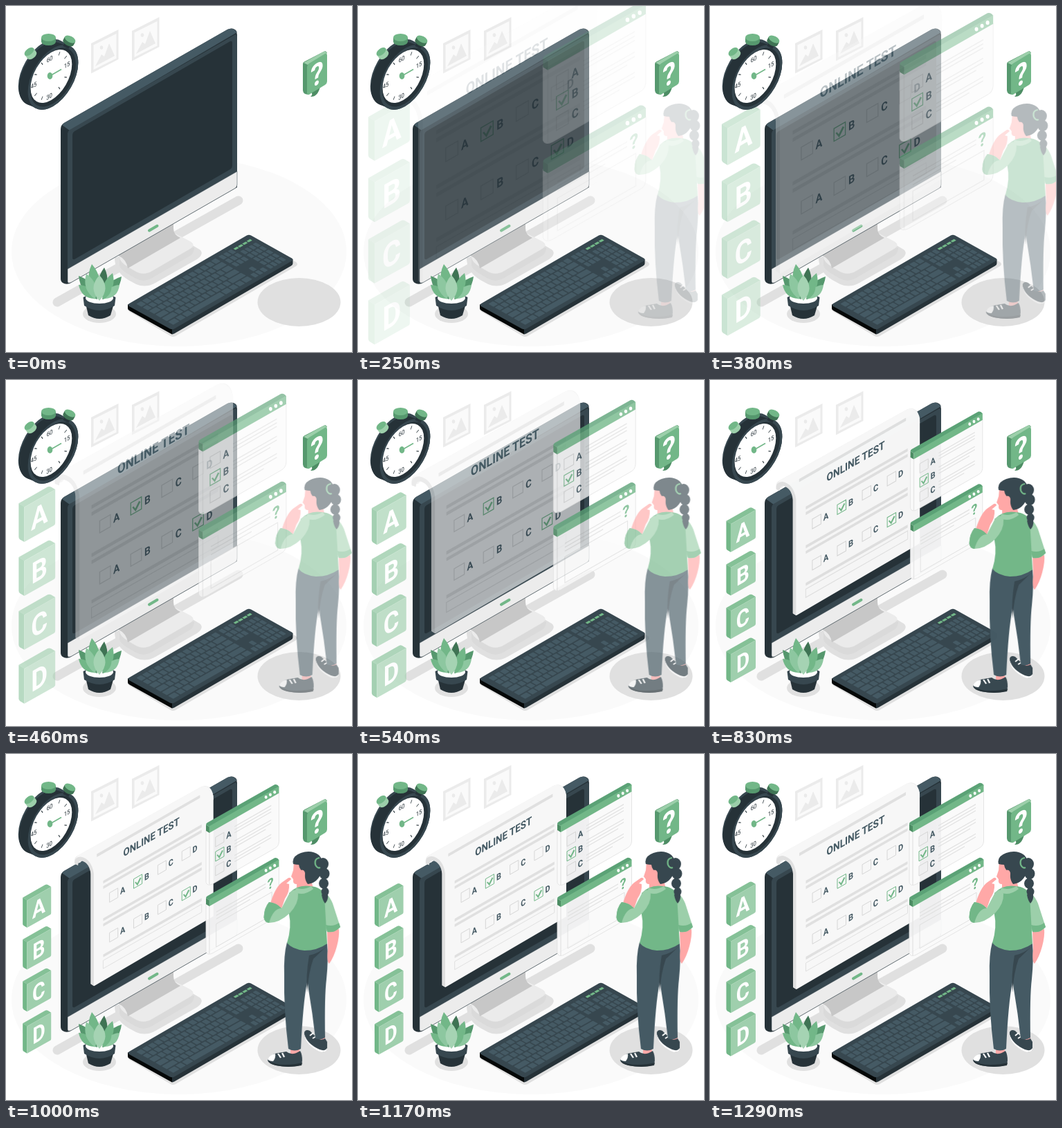
Animation, 500 px wide and 500 px high, one loop 1330 ms. Source, as an HTML page:

```html
<!DOCTYPE html>
<html lang="en">
<head>
<meta charset="utf-8">
<title>Online test</title>
<style>
html, body { margin: 0; width: 100%; height: 100%; overflow: hidden; background: #fff; }
svg { display: block; width: 100%; height: 100%; }
text { font-family: Roboto, "Liberation Sans", sans-serif; font-weight: 700; text-anchor: middle; }
.g { fill: #72b788; } .k { fill: #263238; } .d { fill: #37474f; } .s { fill: #455a64; }
.sh { fill: #e0e0e0; } .skin { fill: #ffa8a7; } .w { fill: #fff; }
#paper, #cards { animation: zoom 1330ms infinite; }
#paper { transform-origin: 199.5px 191px; }
#cards { transform-origin: 44.5px 310px; }
#windows { animation: zoomQuick 1330ms infinite; transform-origin: 342px 166.5px; }
#woman { animation: slide 1330ms infinite; }
@keyframes zoom {
  0% { opacity: 0; transform: scale(1.5); animation-timing-function: cubic-bezier(.32, -.01, .49, 1.38); }
  94%, 100% { opacity: 1; transform: scale(1); }
}
@keyframes zoomQuick {
  0% { opacity: 0; transform: scale(1.5); animation-timing-function: cubic-bezier(.32, -.01, .49, 1.38); }
  80%, 100% { opacity: 1; transform: scale(1); }
}
@keyframes slide {
  0% { opacity: 0; transform: translateX(30px); animation-timing-function: cubic-bezier(.32, -.01, .49, 1.38); }
  94%, 100% { opacity: 1; transform: translateX(0); }
}
</style>
</head>
<body>
<svg viewBox="0 0 500 500">
  <ellipse cx="250" cy="355" rx="242" ry="137" fill="#fafafa"/>
  <path d="M74 428L336 281" stroke="#e0e0e0" stroke-width="13" stroke-linecap="round"/>
  <ellipse cx="423.5" cy="428" rx="60" ry="35" class="sh"/>
  <g id="frames"></g>

  <g id="monitor">
    <path d="M157 364Q157 384 177 396L188 402Q202 408 216 400L276 366Q287 358 280 352L246 332z" class="sh"/>
    <path d="M164 364V374Q164 380 176 387L188 394Q199 400 211 393L266 361Q272 357 272 349z" fill="#dadada"/>
    <path d="M164 362Q164 370 176 377L188 384Q199 390 211 383L266 351Q275 345 266 340L243 328z" fill="#ebebeb"/>
    <path d="M163 358L242 313V321Q242 331 252 335L176 379Q174 366 163 361z" fill="#c7c7c7"/>
    <path d="M79 178Q79 172 84 169L320 34Q328 30 333 36L334 42V262L92 401Q86 403 82 400Q79 398 79 394z" class="k"/>
    <path d="M81 172L84 169L320 34Q328 30 334 38L92 180z" class="s"/>
    <path d="M89 184Q89 181 92 179L330 42Q334 40 334 44V240L89 380z" class="d"/>
    <path d="M96 187Q96 183 99 181L324 51Q327 50 327 53V231Q327 234 324 236L99 366Q96 367 96 364z" class="k"/>
    <path d="M89 380L334 239V258Q334 262 330 264L95 399Q89 402 89 398z" fill="#ececec" stroke="#37474f" stroke-width=".5"/>
    <path d="M207 324.500L218.500 317.800" stroke="#72b788" stroke-width="4" stroke-linecap="round"/>
  </g>

  <g id="paper"></g>
  <g id="windows"></g>

  <g id="keyboard">
    <path d="M177 441L238 477Q241 479 245 477L419 376Q423 373 419 370L404 362z" class="sh"/>
    <path d="M176 431L240 466V474.500L178 440Q176 439 176 437z" fill="#050808"/>
    <path d="M240 465L414.500 366V372Q414.500 374 412 375.500L243 473.500L240 474.500z" class="k"/>
    <path d="M178 430L348 331.500Q351 330 354 331.500L413 364.500Q416 366.500 413 368.500L243 466.500Q240 468 237 466.500L178 434Q175 432 178 430z" class="d"/>
    <g id="keys" transform="matrix(.866 -.498 .866 .49 177 431)" class="s"></g>
  </g>

  <g id="plant">
    <ellipse cx="135" cy="445" rx="24" ry="13" class="sh"/>
    <path d="M115 430L119 447Q135 457 151 447L156 430z" class="k"/>
    <path d="M111.500 421Q135 408 158.500 421L157 433Q135 447 113 433z" class="d"/>
    <ellipse cx="135" cy="422" rx="20" ry="8" class="w"/>
    <g id="leaves"></g>
  </g>

  <g id="cards"></g>

  <g id="bubble">
    <path d="M441 123Q444 128 440 131Q450 132 454 117z" fill="#4d8d64"/>
    <path d="M429 84Q429 81 432 80L459 66Q463 64 464 68L436 88V128L432 127Q429 125 429 122z" fill="#56986e"/>
    <path d="M430 82L459 66Q462 65 464 68L436 85z" fill="#9ccfaa"/>
    <path d="M435 88Q435 85 438 83L461 69Q464 68 464 71V109Q464 112 461 114L438 128Q435 129 435 126z" class="g"/>
  </g>

  <g id="watch">
    <g transform="matrix(.866 -.5 0 1 68 103)">
      <path d="M0 0L-16 -16" stroke="#37474f" stroke-width="84" stroke-linecap="round"/>
      <path d="M0 0L-16 -13" stroke="#263238" stroke-width="82" stroke-linecap="round"/>
      <circle r="42" class="d"/>
      <circle r="38" class="k"/>
      <circle cx="-3" cy="-3" r="34.500" class="w"/>
      <g id="ticks" stroke="#263238" transform="translate(-4 -4)"></g>
    </g>
    <path d="M63.500 101L80 91.500" stroke="#72b788" stroke-width="1.500"/>
    <ellipse cx="63.500" cy="101" rx="3.800" ry="5" class="g"/>
    <g id="digits"></g>
    <g id="knob">
      <path d="M55 52h13v9q-6 3 -13 0z" class="k"/>
      <path d="M51 46v5.500a10.500 5.500 0 0 0 21 0V46z" fill="#56986e"/>
      <ellipse cx="61.500" cy="45.500" rx="10.500" ry="5.500" class="g"/>
    </g>
    <g transform="rotate(-38 35 68)">
      <path d="M31 72h9v7h-9z" class="k"/>
      <path d="M27 66v6a8 4.500 0 0 0 16 0V66z" fill="#9ccfaa"/>
      <ellipse cx="35" cy="65.500" rx="8" ry="4.500" class="g"/>
    </g>
    <g transform="rotate(28 91 50)">
      <path d="M87 53h9v8h-9z" class="k"/>
      <path d="M83 48v5a8.500 4.500 0 0 0 17 0V48z" fill="#3f7354"/>
      <ellipse cx="91.500" cy="47.500" rx="8.500" ry="4.500" class="g"/>
    </g>
  </g>

  <g id="woman">
    <path d="M449 405h14v14q-7 4 -14 -1z" class="skin"/>
    <path d="M433 402Q435 397 441 400L451 410Q457 415 463 411L466 416V427Q463 432 455 429Q437 420 433 407z" class="d"/>
    <path d="M433 405Q437 419 455 427Q463 430 466 425V427Q464 432 455 430Q436 421 433 407z" class="w"/>
    <path d="M441 407l5 -4M445 411l5 -3" stroke="#fff" stroke-width="1.800"/>
    <path d="M413 422h13v13q-7 4 -13 0z" class="skin"/>
    <path d="M380 442Q382 437 390 433L407 430Q415 437 427 429Q430 434 430 443L429 449Q418 453 398 451Q382 449 380 442z" class="d"/>
    <path d="M380 441Q384 434 391 433Q392 439 388 444Q382 444 380 441z" class="w"/>
    <path d="M395 433l4 6M401 432l3 6" stroke="#fff" stroke-width="2.200"/>
    <path d="M380 443Q390 449 405 449T430 446L429 450Q410 454 392 450Q382 448 380 443z" class="k"/>
    <path d="M432 280L466 274Q468 295 465 325Q462 350 463 410Q456 414 449 411Q445 375 439 340z" class="s"/>
    <path d="M408 272L451 276Q443 300 437 330Q431 360 428 426Q419 431 410 426Q403 370 404 320Q403 290 408 272z" class="s"/>
    <path d="M466 277Q455 288 440 291Q435 320 437 345Q439 315 446 296z" class="d"/>
    <path d="M466 256L483 253Q484 263 480 278Q476 293 469 303Q465 300 467 283z" class="skin"/>
    <path d="M452 194Q467 199 474 216L485 250Q477 259 466 257L456 232z" fill="#9ccfaa"/>
    <path d="M464 247Q475 250 483 244L485 250Q477 259 466 257z" class="g"/>
    <path d="M422 182L442 178L446 195Q432 207 422 198z" class="skin"/>
    <path d="M411 201Q423 188 442 191Q458 192 462 205L466 274Q452 284 433 284Q415 282 408 273Q415 250 411 232z" class="g"/>
    <path d="M421 193Q430 198 443 191L446 195Q432 206 419 200z" fill="#9ccfaa"/>
    <path d="M383 219Q390 194 400 186L410 179Q413 178 414 181L407 187L411 188Q412 199 405 209L399 226z" class="skin"/>
    <path d="M374.500 236Q375 222 382 214Q393 215 400 223L411 202Q419 191 424 202Q425 216 412 230Q397 244 382 244Q375 243 374.500 236z" fill="#9ccfaa"/>
    <path d="M374.500 236Q375 222 382 214Q393 215 400 223Q388 223 382 244Q375 243 374.500 236z" class="g"/>
    <path d="M418 156L440 157L441 183Q432 190 421 188Q416 188 417 181L414 177L417 168z" class="skin"/>
    <path d="M417 159Q414 148 428 143Q443 138 454 146Q462 154 458 170Q453 186 438 188Q433 182 434 172Q426 168 425 160Q421 160 417 159z" class="d"/>
    <ellipse cx="430" cy="173" rx="4" ry="5.500" class="skin"/>
    <g class="d">
      <ellipse cx="460" cy="159" rx="8" ry="9"/>
      <ellipse cx="462" cy="173" rx="7.500" ry="8"/>
      <ellipse cx="461" cy="187" rx="7" ry="7.500"/>
      <ellipse cx="463" cy="199" rx="5.500" ry="6.500"/>
      <path d="M458 203h9Q468 211 463 216Q459 211 458 203z"/>
    </g>
    <path d="M455 150Q447 151 449 160Q452 166 456 164" fill="none" stroke="#72b788" stroke-width="2.200"/>
  </g>
</svg>
<script>
const SLOPE = -0.572;
const put = (id, html) => document.getElementById(id).insertAdjacentHTML('beforeend', html);
const times = (n, f) => Array.from({ length: n }, (_, i) => f(i)).join('');

// Everything on a wall plane shares one slope; x, y is the top left corner.
const slab = (x, y, w, h, attr) =>
  `<path d="M${x} ${y}l${w} ${w * SLOPE}v${h}l${-w} ${-w * SLOPE}z" ${attr}/>`;
const label = (x, y, size, str, fill, weight = 700) =>
  `<text transform="matrix(.866 -.5 0 1 ${x} ${y})" font-size="${size}" dy=".355em"
    fill="${fill}" style="font-weight:${weight}">${str}</text>`;
const line = 'fill="none" stroke="#e0e0e0"';

function option(x, y, name, checked) {
  const box = slab(x - 6, y - 3.5, 12.5, 14, `fill="none" stroke="${checked ? '#72b788' : '#d6d6d6'}"`);
  const tick = `<path d="M${x - 3.5} ${y + 1}l3 3.500 5 -10" fill="none" stroke="#72b788" stroke-width="2"/>`;
  return box + (checked ? tick : '') + label(x + 13.5, y - 7.5, 12.8, name, '#455a64');
}

// Wall pictures
put('frames', times(2, i => `<g transform="translate(${i * 59} ${i * -18})">
  <path d="M123 54L162.500 34V77L123 97.500z" fill="#ebebeb"/>
  <path d="M126.500 56.500L159.500 40V75.500L126.500 92z" fill="#fafafa"/>
  <path d="M129 87L138 70L142 73L149 54L157 72z" fill="#ebebeb"/>
  <ellipse cx="138" cy="60" rx="2.300" ry="2.800" fill="#ebebeb"/></g>`));

// Test sheet
put('paper', `
  <path d="M96 158Q94 148 101 145L284 43Q297 37 302 52L303 62L122 166L118 156Q110 148 104 156z" fill="#ededed"/>
  <path d="M98 149L101 145L284 43Q298 38 303 56V236L125 340L120 337V172Q120 154 109 149Q103 147 98 152z" fill="#f7f7f7"/>
  <path d="M96 158Q95 147 105 147Q121 150 124.500 172V340L120 337V173Q118 156 106 153Q101 153 101 160z" fill="#e0e0e0"/>` +
  slab(129, 143, 154, 4.5, 'class="sh"') +
  label(210.5, 117.5, 15.8, 'ONLINE TEST', '#455a64', 600) +
  [183, 191, 239, 247, 293].map(y => slab(138.5, y, 147, 4.2, 'class="sh"')).join('') +
  slab(138.5, 302, 147, 12, line) +
  times(2, r => times(4, i =>
    option(154 + 36 * i, 204.5 + 59.5 * r - 20.6 * i, 'ABCD'[i], i === (r ? 3 : 1)))));

// Browser windows
const browser = (y, h) => `
  <path d="M288 ${y + 9}L293 ${y + 12}L395.500 ${y - 46}V${y - 52 + h}Q395 ${y - 45 + h} 389 ${y - 42 + h}L298 ${y + 10 + h}Q290 ${y + 14 + h} 288 ${y + 8 + h}z"
    fill="#fafafa" fill-opacity=".95" stroke="#e0e0e0" stroke-width=".8"/>
  <path d="M293 ${y + 12}V${y + 11 + h}" stroke="#e6e6e6" stroke-width="1.500"/>
  <path d="M288 ${y + 1}L293 ${y + 4}V${y + 13}L288 ${y + 10}z" fill="#4d8d64"/>
  <path d="M288 ${y + 1}Q288 ${y - 1} 290 ${y - 2}L389 ${y - 58}Q393 ${y - 59} 395.500 ${y - 55}L293 ${y + 4}z" fill="#5ba276"/>
  ${slab(293, y + 3, 102.5, 10, 'class="g"')}` +
  times(3, i => `<ellipse cx="${376.3 + 6.4 * i}" cy="${y - 39.5 - 3.7 * i}" rx="2" ry="2.400" class="w"/>`);

put('windows', browser(100, 78) +
  times(3, i => option(308, 123 + 21.3 * i, 'ABC'[i], i === 1) +
    [0, 4.6, 9.2].map((d, j) => slab(330, 103 + 21.3 * i + d, j < 2 ? 54 : 54 - 8 * i, 1.3, 'class="sh"')).join('')) +
  browser(208, 72) +
  times(3, i => slab(303, 229 + 5 * i, i < 2 ? 73 : 50, 1.3, 'class="sh"')) +
  slab(303, 247, 82, 34, line) +
  label(383, 187.5, 21, '?', '#72b788'));

// Keyboard
const ROW = 10.6;
const key = (x, r, w) => `<rect x="${x}" y="${6 + ROW * r}" width="${w - 1.8}" height="8.600" rx="1"/>`;
const spread = (n, a, b) => [a, ...Array(n).fill(1), b];
const rows = [spread(12, 1, 1), spread(12, 1, 2), spread(12, 1.5, 1.5), spread(11, 1.8, 2.2),
  spread(10, 2.3, 2.7), [1.4, 1.2, 1.4, 6, 1.4, 1.2, 1.2, 1.4]];
let keys = '';
rows.forEach((row, r) => {
  const unit = 134 / row.reduce((a, b) => a + b);
  let x = 7;
  for (const w of row) {
    keys += key(x, r, w * unit);
    x += w * unit;
  }
  for (let c = 0; c < 3; c++) {
    if (r < 3 || r === 5 || (r === 4 && c === 1)) keys += key(144 + 7.7 * c, r, 7.7);
  }
  for (let c = 0; c < 4; c++) {
    keys += r ? key(169.5 + 7 * c, r, 7)
      : `<rect x="${168 + 7.3 * c}" y="7" width="6" height="3.600" fill="#72b788"/>`;
  }
});
put('keys', keys);

// Plant
const leaf = (x, y, tx, ty, w, fill) => {
  const mx = x + (tx - x) * .5, my = y + (ty - y) * .5, len = Math.hypot(tx - x, ty - y);
  const px = (ty - y) / len * w, py = (x - tx) / len * w;
  return `<path d="M${x} ${y}Q${mx + px} ${my + py} ${tx} ${ty}Q${mx - px} ${my - py} ${x} ${y}z" fill="${fill}"/>`;
};
put('leaves', [
  [138, 420, 142, 378, 13, '#3f7354'], [131, 422, 124, 373, 16, '#72b788'],
  [132, 424, 105, 390, 14, '#56986e'], [139, 424, 167, 391, 14, '#56986e'],
  [142, 422, 154, 386, 13, '#72b788'], [128, 423, 105, 403, 12, '#72b788'],
  [143, 423, 164, 403, 12, '#8dc7a0'], [129, 424, 116, 387, 14, '#8dc7a0'],
  [141, 424, 149, 395, 14, '#72b788'], [135, 426, 135, 389, 17, '#a5d3b3'],
].map(a => leaf(...a)).join(''));

// Answer cards
put('cards', times(4, i => `<g transform="translate(0 ${62.6 * i})">
  <path d="M23.500 204L30 208V249L25 246Q23.500 245 23.500 243z" class="g"/>
  <path d="M23.500 204L57 185Q59 184 61 185L66 188L30 208.500z" fill="#85c197"/>
  <path d="M30 208.500L66 188V227Q66 229 64 230L30 249z" fill="#9fcfad"/>
  ${label(47.5, 218.5, 34, 'ABCD'[i], '#fff')}</g>`));

put('bubble', label(449.5, 98.5, 44, '?', '#fff'));
put('ticks', times(12, i => i % 3 ? `<path d="M0 -31V-26.500" transform="rotate(${30 * i})"/>` : ''));
put('digits', [[63, 76.5, '60'], [88, 85, '15'], [62.5, 130.5, '30'], [40, 114.5, '45']]
  .map(([x, y, s]) => label(x, y, 9, s, '#263238', 400)).join(''));
</script>
</body>
</html>
```
